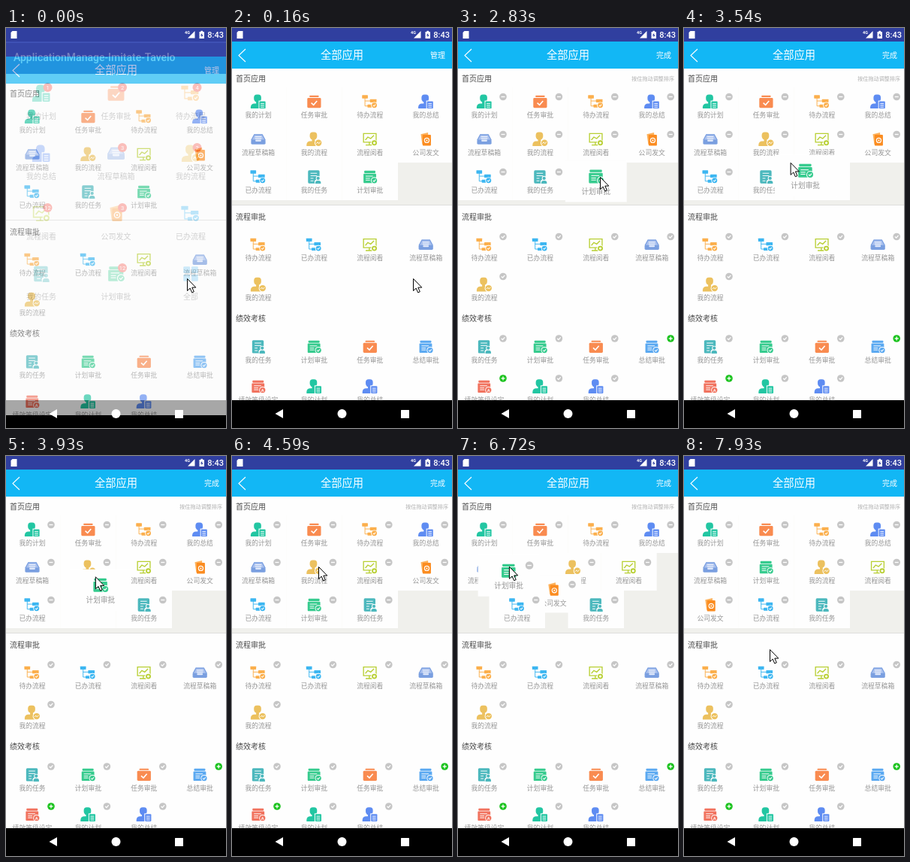
An HTML page with a canvas that plays this animation: 293 by 532 pixels, repeating every 8 s.

```html
<!DOCTYPE html>
<html lang="zh-CN">
<head>
<meta charset="utf-8">
<style>
html, body { margin: 0; width: 100%; height: 100%; overflow: hidden; background: #000 }
canvas { display: block }
</style>
</head>
<body>
<canvas id="stage" width="293" height="532"></canvas>
<script>
const W = 293, H = 532, LOOP = 8000;
const STATUS = 18, BAR = 36, NAV = 495;
const PAPER = '#fefefe', GREY = '#f0f0ec', NAVY = '#303f9f';
const ENTERED = 160, EDITING = 2830;
const screen2d = document.getElementById('stage').getContext('2d');
const layer = Object.assign(document.createElement('canvas'), { width: W, height: H });
const layer2d = layer.getContext('2d');
let g = screen2d;

// ---- drawing helpers ----
function rect(x, y, w, h, color, radius = 0) {
  g.fillStyle = color;
  g.beginPath();
  g.roundRect(x, y, w, h, radius);
  g.fill();
}
function disc(x, y, r, color) {
  g.fillStyle = color;
  g.beginPath();
  g.arc(x, y, r, 0, 7);
  g.fill();
}
function fill(path, color) {
  g.fillStyle = color;
  g.fill(new Path2D(path));
}
function stroke(path, color, width = 1) {
  g.strokeStyle = color;
  g.lineWidth = width;
  g.stroke(new Path2D(path));
}
function text(s, x, y, size, color, align = 'center', weight = 400) {
  const family = /[^\x00-\x7f]/.test(s) ? '"Noto Sans CJK SC", "Noto Sans CJK"' : 'Roboto';
  g.font = `${weight} ${size}px ${family}, sans-serif`;
  g.textAlign = align;
  g.textBaseline = 'middle';
  g.fillStyle = color;
  g.fillText(s, x, y);
}
function at(x, y, scale, draw) {
  g.save();
  g.translate(x, y);
  g.scale(scale, scale);
  draw();
  g.restore();
}

// ---- icons, about 20 x 20 around the origin ----
function rules(x, y, w, n, gap = 2.5) {
  for (let i = 0; i < n; i++) rect(x, y + i * gap, w, 1, '#fff');
}
function tick(x, y, s, width = 1.1) {
  at(x, y, s, () => stroke('M-1 0L-.2 .7L1-.7', '#fff', width / s));
}
function seal(r, c) {
  disc(6, 5, r + 1, '#fff');
  disc(6, 5, r, c);
}
function person(c) {
  rect(-6, -10, 10, 11, c, [4, 4, 5, 5]);
  rect(-3, 0, 4, 4, c);
  rect(-10.5, 2.5, 17, 7, c, [5, 5, 0, 0]);
}
const icons = {
  report(c) {
    person(c);
    rect(.5, -1.5, 10, 11.5, '#fff');
    rect(1.5, -.5, 8.5, 10, c, 1);
    rules(3.2, 2, 5, 3);
  },
  flow(c) {
    person(c);
    seal(4.4, c);
    stroke('M3 6L5 4L6.5 6L9 3.5', '#fff');
  },
  briefcase(c) {
    rect(-6.5, -8.5, 13, 2.3, c, 1);
    rect(-9.5, -5.2, 19, 13.7, c, 1.5);
    tick(0, 1.7, 4, 1.6);
  },
  tree(c) {
    stroke('M-7-6V6H1M-7-1H4', c);
    rect(-11, -9, 8, 4.5, c, .6);
    rect(0, -3.5, 9, 4.5, c, .6);
    rect(-3.5, 4, 6, 4, c, .6);
    seal(3.6, c);
    tick(6, 5, 1.8);
  },
  tray(c) {
    fill('M-5.5-7H5.5L10 1H-10Z', '#a9c0ee');
    stroke('M-9.5 1L-5.5-6.5H5.5L9.5 1', c, 1.3);
    rules(-4.5, -4, 9, 2);
    rect(-10, .5, 20, 6.5, c, 1.5);
    rect(-4, .5, 8, 2.5, '#dfe8fa', 1);
  },
  monitor(c) {
    stroke('M-9-8H8.5V4H-9ZM-6.5 1L-3-3L1-1L5.5-5.5M-1 4V8M-6 8H3', c, 1.4);
    seal(3.6, c);
    disc(6, 5, 1.7, '#fff');
  },
  papers(c) {
    fill('M-7-7L3-9.5L4 5L-5 7Z', '#fdb25c');
    rect(-4.5, -6.2, 11.5, 15, c, 1);
    disc(1.3, 1.5, 3.8, '#fff');
    disc(1.3, 1.5, 2.6, c);
    disc(1.3, 1.5, 1.1, '#fff');
  },
  sheet(c) {
    rect(-8.5, -9, 16, 18, c, 1.6);
    rules(-5, -5.5, 9, 2, 3.5);
    rules(-5, 1.5, 4, 2, 3.5);
    rect(.5, 4, 10, 6, '#fff', 3);
    disc(5.5, 2, 3.2, '#fff');
    disc(5.5, 2, 2.2, c);
    rect(1.7, 5.2, 7.6, 4.3, c, [3, 3, 0, 0]);
  },
  board(c, mark) {
    rect(-8, -8.5, 15.5, 3.2, c, 1);
    rect(-9, -4.5, 17.5, 13, c, 1);
    rules(-6, -1.5, 10, 1);
    rules(-6, 1.5, 6, 2);
    seal(3.8, c);
    if (mark) text(mark, 6, 5.4, 6, '#fff', 'center', 700);
    else tick(6, 5, 2);
  },
  tiles(c) {
    for (const x of [-8.5, .8]) for (const y of [-8.5, .8]) rect(x, y, 7.7, 7.7, c, 1);
  }
};
const apps = {
  我的计划: ['report', '#22c6a2'], 任务审批: ['briefcase', '#f98b50'],
  待办流程: ['tree', '#fbaf4c'], 我的总结: ['report', '#5e8cf2'],
  流程草稿箱: ['tray', '#7a9fe0'], 我的流程: ['flow', '#ecc15f'],
  流程阅看: ['monitor', '#b8cf33'], 公司发文: ['papers', '#fb8c20'],
  已办流程: ['tree', '#3cb6f1'], 我的任务: ['sheet', '#4cb8bd'],
  计划审批: ['board', '#36cb8e'], 总结审批: ['board', '#5ba9f1'],
  绩效等级设定: ['board', '#f1735f', 'A'], 全部: ['tiles', '#6cc3f0']
};
function icon(name, x, y, scale = .96) {
  const [kind, color, mark] = apps[name];
  at(x, y, scale, () => icons[kind](color, mark));
}
const label = (name, x, y) => text(name, x, y, 8.8, '#969696');
function badge(x, y, kind) {
  disc(x, y, 4.8, kind === 'plus' ? '#1cc31f' : '#c6c6c6');
  if (kind === 'tick') return tick(x, y, 2.3, 1.3);
  rect(x - 2.5, y - .65, 5, 1.3, '#fff');
  if (kind === 'plus') rect(x - .65, y - 2.5, 1.3, 5, '#fff');
}

// ---- motion ----
const clamp = v => Math.max(0, Math.min(1, v));
const ease = (t, start, length = 250) => .5 - Math.cos(Math.PI * clamp((t - start) / length)) / 2;
const mix = (a, b, f) => a.map((v, i) => v + (b[i] - v) * f);

// Each move is a curve from the last place, through a bend, to an end point.
const moves = [
  { from: 500, to: 1600, bend: [268, -65], end: [189, 198] },
  { from: 3120, to: 4200, bend: [113, 174], end: [115, 147] },
  { from: 4800, to: 5200, bend: [146, 185], end: [111, 200] },
  { from: 5900, to: 6860, bend: [64, 180], end: [68, 134] },
  { from: 7300, to: 7930, bend: [75, 200], end: [114, 257] }
];
function pointer(t) {
  let pos = [241, 333];
  for (const { from, to, bend, end } of moves) {
    const p = clamp((t - from) / (to - from));
    pos = mix(mix(pos, bend, p), mix(bend, end, p), p);
  }
  return pos;
}

// ---- home grid ----
const COL = 74.4, ROW = 50;
const cell = (i, top, pitch) => [35 + COL * (i % 4), top + pitch * Math.floor(i / 4)];
const slot = i => cell(i, 104, ROW);
function moveTo(list, name, index) {
  const rest = list.filter(n => n !== name);
  rest.splice(index, 0, name);
  return rest;
}
const dragged = '计划审批';
const first = Object.keys(apps).slice(0, 11);
const second = moveTo(first, dragged, 9);
const third = moveTo(second, dragged, 5);
const drags = [
  { lift: EDITING, drop: 4300, lag: 250, start: 10, end: 9 },
  { lift: 6000, drop: 7340, lag: 100, start: 9, end: 5, badge: true }
];
const DROP = 270;

function card(name, [x, y], scale, withBadge) {
  at(x, y, scale, () => {
    rect(-COL / 2, -ROW / 2, COL, ROW, PAPER);
    if (!name) return;
    icon(name, 0, -6);
    label(name, 0, 12);
    if (withBadge) badge(25, -12.5, 'minus');
  });
}
function liftedCard(drag, t) {
  const now = pointer(Math.min(t, drag.drop) - drag.lag), grip = pointer(drag.lift - drag.lag);
  const held = slot(drag.start).map((v, i) => v + now[i] - grip[i]);
  const landed = ease(t, drag.drop, DROP);
  card(dragged, mix(held, slot(drag.end), landed), 1.1 - .1 * landed, drag.badge);
}
function homeGrid(t) {
  rect(0, 79, W, 157, t < ENTERED ? PAPER : GREY);
  const drag = drags.find(d => t >= d.lift && t < d.drop + DROP);
  const shifts = [ease(t, 3680), ease(t, 6582)];
  const order = shifts[1] ? third : shifts[0] ? second : first;
  for (const name of order) {
    const hidden = drag && name === dragged;
    const [s1, s2] = hidden ? shifts.map(Math.ceil) : shifts;
    const [a, b, c] = [first, second, third].map(list => slot(list.indexOf(name)));
    card(hidden ? '' : name, mix(mix(a, b, s1), c, s2), 1, t >= EDITING);
  }
  if (drag) liftedCard(drag, t);
}

// ---- pages ----
const heading = (s, y) => text(s, 5, y, 10, '#484848', 'left');
function section(title, y, names, editing) {
  heading(title, y);
  names.forEach((name, i) => {
    const [x, cy] = cell(i, y + 37.3, 53);
    icon(name, x, cy);
    label(name, x, cy + 17.5);
    if (editing) badge(x + 25, cy - 10.8, /^总结审批|^绩效/.test(name) ? 'plus' : 'tick');
  });
}
function managePage(t) {
  const editing = t >= EDITING;
  rect(0, 0, W, H, PAPER);
  homeGrid(t);
  rect(0, 235, W, 1, '#dededc');
  heading('首页应用', 67);
  if (editing) text('按住拖动调整排序', 288, 67, 7.1, '#b0b0b0', 'right');
  section('流程审批', 251, ['待办流程', '已办流程', '流程阅看', '流程草稿箱', '我的流程'], editing);
  section('绩效考核', 386.5, ['我的任务', '计划审批', '任务审批', '总结审批',
    '绩效等级设定', '我的计划', '我的总结'], editing);
  rect(0, 0, W, STATUS, NAVY);
  rect(0, STATUS, W, BAR, '#12b7f5');
  stroke('M18 28L9 36.5L18 45', '#fff', 1.1);
  text('全部应用', W / 2, 36, 14.3, '#fff');
  text(editing ? '完成' : '管理', 284, 36, 10, '#fff', 'right', 500);
  rect(0, NAV, W, H, '#000');
}

// The earlier page, seen through the entering one.
const counts = [1, 2, 4, 0, 3, 2, 12, 3, 0, 0, 12, 0];
function homePage() {
  rect(0, 0, W, H, '#fafafa');
  rect(0, 0, W, STATUS, NAVY);
  rect(0, STATUS, W, 43, '#3f51b5');
  text('ApplicationManage-Imitate-Tavelo', 10, 39.5, 14, '#fff', 'left', 500);
  [...first, '全部'].forEach((name, i) => {
    const x = 47 + 99.5 * (i % 3), y = 87 + 80 * Math.floor(i / 3);
    icon(name, x, y, 1.15);
    text(name, x, y + 30, 10, '#777');
    if (!counts[i]) return;
    disc(x + 8.5, y - 8, 6, '#f44336');
    text(String(counts[i]), x + 8.5, y - 7.5, 7.5, '#fff');
  });
  rect(0, NAV, W, H, '#000');
}

// ---- system bars and pointer ----
function systemBars() {
  fill('M8.5 4h6v10h-8v-8Z', '#fff');
  text('4G', 238, 6.5, 5.5, '#fff', 'left', 700);
  fill('M251.5 4v9.5h-9.5Z', '#fff');
  rect(257.5, 5, 6.5, 9, '#fff', .6);
  rect(259.4, 3.8, 2.7, 2, '#fff');
  fill('M261.3 6.5L259 10h1.5v2.5L262.5 9H261Z', NAVY);
  text('8:43', 290, 10, 11, '#fff', 'right', 500);
  fill('M57.5 513l10.5-6v12Z', '#fff');
  disc(146.5, 513, 6, '#fff');
  rect(225, 508, 11, 11, '#fff', .5);
}
function arrow([x, y]) {
  const shape = 'M0 0V16L3.7 12.6L6.2 18.4L8.8 17.3L6.3 11.6H11.3Z';
  at(x + .5, y + .5, 1, () => {
    fill(shape, '#fff');
    stroke(shape, '#000');
  });
}

function render(t) {
  g = layer2d;
  managePage(t);
  g = screen2d;
  const entering = t < ENTERED;
  if (entering) homePage();
  g.globalAlpha = entering ? .66 : 1;
  g.drawImage(layer, 0, entering ? 20 : 0);
  g.globalAlpha = 1;
  systemBars();
  arrow(pointer(t));
}
const start = performance.now();
function frame() {
  render((performance.now() - start) % LOOP);
  requestAnimationFrame(frame);
}
frame();
</script>
</body>
</html>
```
